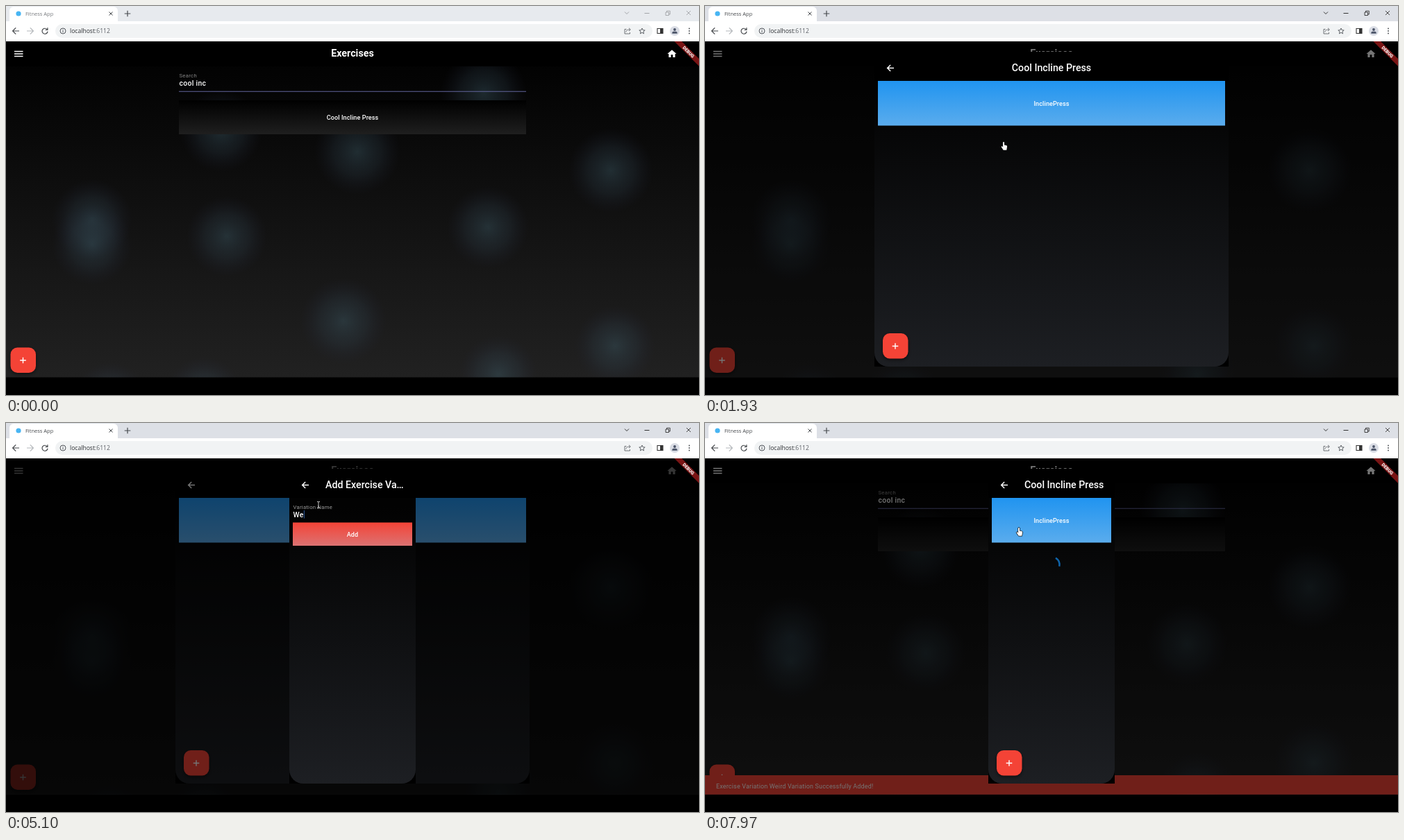
Recreate the animation shown at these times as an HTML page with a canvas. Size 998 px wide and 561 px high, loop 8 s.

```html
<!DOCTYPE html>
<html lang="en">
<head>
<meta charset="utf-8">
<title>Fitness App</title>
<style>
html, body { margin: 0; width: 100%; height: 100%; overflow: hidden; background: #000; }
canvas { display: block; width: 998px; height: 561px; }
</style>
</head>
<body>
<canvas id="stage" width="998" height="561"></canvas>
<script>
const ctx = document.getElementById('stage').getContext('2d');
const LOOP = 8000;
const TYPED = 'Weird Variation';
const APP = 'Roboto, sans-serif', UI = '"Open Sans", sans-serif';

// Moments of the story, in ms
const ACTIVE = 400, HOVER = 880, OPEN = 1280, LOADED = 1620, ADD = 2560,
  FOCUS = 3420, TYPE = 4930, KEY = 105, SUBMIT = 7630, RELOAD = 7760;

const BUBBLES = [
  [688, 126, 62], [310, 180, 59], [506, 210, 62], [871, 237, 61],
  [124, 308, 58], [124, 344, 58], [318, 332, 58], [694, 319, 59],
  [486, 454, 62], [877, 490, 58], [709, 531, 56], [285, 560, 54], [150, 566, 52]
];

// time, x, y, shape used from this moment on
const POINTER = [
  [350, 560, 536, 'arrow'], [HOVER, 451, 166, 'hand'], [1500, 451, 167, 'hand'],
  [1800, 431, 202, 'hand'], [2100, 431, 202, 'arrow'], [2440, 279, 498, 'hand'],
  [2640, 281, 503, 'arrow'], [2880, 281, 503, 'arrow'], [3300, 450, 118, 'beam'],
  [6780, 450, 118, 'beam'], [6930, 442, 124, 'beam'], [7250, 445, 146, 'hand'],
  [7450, 453, 157, 'hand'], [LOOP, 453, 157, 'hand']
];

const clamp = v => Math.max(0, Math.min(1, v));
const ramp = (t, start, span) => clamp((t - start) / span);
const easeOut = v => 1 - (1 - v) ** 3;
const easeInOut = v => v * v * (3 - 2 * v);
const mix = (a, b, v) => a + (b - a) * v;

function rect(x, y, w, h, fill, r = 0) {
  ctx.fillStyle = fill;
  ctx.beginPath();
  ctx.roundRect(x, y, w, h, r);
  ctx.fill();
}

function fade(y0, y1, a, b) {
  const g = ctx.createLinearGradient(0, y0, 0, y1);
  g.addColorStop(0, a);
  g.addColorStop(1, b);
  return g;
}

function text(s, x, y, size, color, { weight = 400, family = APP, align = 'left', gap = 0 } = {}) {
  ctx.font = `${weight} ${size}px ${family}`;
  ctx.textAlign = align;
  ctx.letterSpacing = gap + 'px';
  ctx.fillStyle = color;
  ctx.fillText(s, x, y);
  return ctx.measureText(s).width;
}

function path(d, color, width = 1.2, x = 0, y = 0) {
  ctx.save();
  ctx.translate(x, y);
  ctx.strokeStyle = color;
  ctx.lineWidth = width;
  ctx.stroke(new Path2D(d));
  ctx.restore();
}

function shape(d, fill, x = 0, y = 0, outline) {
  ctx.save();
  ctx.translate(x, y);
  const p = new Path2D(d);
  if (outline) {
    ctx.strokeStyle = outline;
    ctx.lineWidth = 1.4;
    ctx.lineJoin = 'round';
    ctx.stroke(p);
  }
  ctx.fillStyle = fill;
  ctx.fill(p);
  ctx.restore();
}

function disc(x, y, r, fill) {
  ctx.fillStyle = fill;
  ctx.beginPath();
  ctx.arc(x, y, r, 0, 7);
  ctx.fill();
}

const CROSS = 'M-2.5-2.5L2.5 2.5M2.5-2.5L-2.5 2.5';
const PLUS = 'M-4.3 0H4.3M0-4.3V4.3';
const BACK = 'M5 0H-4.2M0.2-4.6L-4.4 0L0.2 4.6';

function browser(active) {
  const ink = active ? '#333' : '#a2a4a8';
  rect(0, 0, 998, 24, active ? '#dde0e6' : '#e7eaee');
  rect(5, 1, 156, 26, '#fff', 6);
  rect(0, 22, 998, 29, '#fff');
  rect(5, 16, 156, 8, '#fff');
  disc(18, 11, 3.6, '#47b5f3');
  text('Fitness App', 28, 14, 7.5, active ? '#45484c' : '#777a7e', { family: UI });
  path(CROSS, '#45484c', 1, 151, 11);
  path(PLUS, '#45484c', 1.2, 175, 11);

  path('M-3-1.5L0 1.5L3-1.5', ink, 1, 894, 10);
  path('M-3.5 0H3.5', ink, 1, 923, 10.5);
  path('M-3-1H1.5V3.5H-3ZM-1.5-1V-2.8H3.3V2H1.5', ink, 0.9, 953, 10);
  path('M-3-3L3 3M3-3L-3 3', ink, 0.9, 983, 10);

  path(BACK, '#45484c', 1.2, 14, 36);
  path('M-5 0H4.2M-0.2-4.6L4.4 0L-0.2 4.6', '#b4b7bb', 1.2, 35, 36);
  path('M3.1-2.3A4 4 0 1 0 4 .6M3.9-4.8V-1.5H.6', '#45484c', 1.2, 56, 36);

  rect(71, 26, 860, 20, '#f1f3f4', 10);
  path('M4 0A4 4 0 1 1-4 0A4 4 0 1 1 4 0M0-.6V2.2M0-2.2V-1.2', '#50545a', 1, 82, 36);
  const w = text('localhost', 92, 39, 8.6, '#2c2f33', { family: UI });
  text(':6112', 92 + w, 39, 8.6, '#5f6368', { family: UI });
  path('M-1.5-2.5H-4V4H3.5V2M-2 1.5C-2-1 0-2 4-2M2-4.2L4.3-2L2 .2', '#5f6368', 0.9, 895, 36);
  path('M0-4L1.2-1.3L4.2-1L1.9.9L2.6 3.9L0 2.3L-2.6 3.9L-1.9.9L-4.2-1L-1.2-1.3Z', '#50545a', 0.9, 916, 36);
  path('M-4-3.5H4V3.5H-4Z', '#333', 1.1, 942, 36);
  rect(942, 32.5, 4, 7, '#333');
  disc(963, 36, 7, '#dadde5');
  disc(963, 34, 1.9, '#4b5468');
  rect(959.3, 36.7, 7.4, 3, '#4b5468', [2, 2, 0, 0]);
  for (const y of [32.5, 36, 39.5]) disc(984, y, 0.9, '#45484c');
}

function fab(x, y, color = '#f44336') {
  ctx.save();
  ctx.shadowColor = 'rgba(0,0,0,.5)';
  ctx.shadowBlur = 5;
  ctx.shadowOffsetY = 2;
  rect(x, y, 36.5, 36.5, color, 10);
  ctx.restore();
  path(PLUS, '#fff', 1.4, x + 18, y + 18.5);
}

function page(t) {
  rect(0, 51, 998, 485, fade(51, 535, '#000', '#212121'));
  for (const [x, y, r] of BUBBLES) {
    const g = ctx.createRadialGradient(x, y, 0, x, y, r);
    g.addColorStop(0, 'rgba(62,92,104,.42)');
    g.addColorStop(0.55, 'rgba(50,68,82,.25)');
    g.addColorStop(1, 'rgba(36,40,62,0)');
    disc(x, y, r, g);
  }
  rect(0, 51, 998, 36, '#000');
  path('M12 65.5H24.5M12 69H24.5M12 72.5H24.5', '#fff', 1.4);
  text('Exercises', 499, 73, 14.3, '#fff', { weight: 700, align: 'center' });
  shape('M0-5.8L6.5 0H4.6V5H1.4V1.3H-1.4V5H-4.6V0H-6.5Z', '#fff', 959, 69);

  text('Search', 249.5, 103, 7.7, '#858585', { gap: 0.3 });
  text('cool inc', 249.5, 115, 10.4, '#fff', { weight: 500, gap: 0.3 });
  rect(249, 122.7, 500, 1, '#62659c');
  rect(249, 136, 500, 49, fade(136, 185, '#000', '#1f1f1f'));
  if (t >= HOVER && t < SUBMIT) rect(249, 136, 500, 49, 'rgba(15,90,125,.13)');
  text('Cool Incline Press', 499, 163.5, 9.1, '#fff', { weight: 500, align: 'center', gap: 0.07 });
  fab(6.5, 492.5);

  const rise = easeOut(ramp(t, 7670, 250));
  if (rise > 0) {
    const y = 535.5 - 27.5 * rise;
    rect(0, y, 998, 28, '#f44336');
    text(`Exercise Variation ${TYPED} Successfully Added!`, 16, y + 19, 9, '#fff', { gap: 0.16 });
  }
}

function barrier(a) {
  rect(0, 51, 998, 485, `rgba(0,0,0,${0.54 * a})`);
}

function panel(left, title) {
  const w = 998 - 2 * left;
  rect(left, 66, w, 454, '#000');
  rect(left, 66, w, 454, fade(120, 520, '#020202', '#1d1f23'), 20);
  rect(left, 66, w, 42, '#000');
  path(BACK, '#fff', 1.4, left + 23, 89.5);
  if (left > 300) text(title, left + 52, 94, 14.2, '#fff', { weight: 500 });
  else text(title, 499, 94, 14.2, '#fff', { weight: 500, align: 'center' });
}

function spinner(age) {
  const start = -Math.PI / 2 + age * 0.0026;
  const sweep = Math.min(4.7, 1.13 * (age / 200) ** 1.3);
  ctx.strokeStyle = '#0f63a8';
  ctx.lineWidth = 2.5;
  ctx.beginPath();
  ctx.arc(499, 204.5, 11.5, start, start + sweep);
  ctx.stroke();
}

function exercise(t) {
  const reload = t >= RELOAD;
  const loading = reload || t < LOADED;
  const left = loading ? 408 : 244;
  panel(left, 'Cool Incline Press');
  rect(left + 5, 108, 988 - 2 * left, 64.5, fade(108, 172, '#2094f0', '#5aaced'));
  text('InclinePress', 499, 143.5, 9.1, '#fff', { weight: 500, align: 'center', gap: 0.07 });
  if (loading) spinner(t - (reload ? RELOAD : OPEN));
  fab(left + 12, 472, t > 2500 && t < 2920 ? '#d63b30' : '#f44336');
}

function variation(t) {
  panel(408, 'Add Exercise Va…');
  const up = easeInOut(ramp(t, FOCUS, 110));
  text('Variation Name', 413.5, mix(128.7, 123.5, up), mix(10.4, 7.7, up), '#9a9a9a', { gap: mix(0.32, 0.25, up) });
  const count = t < TYPE ? 0 : Math.min(TYPED.length, 1 + Math.floor((t - TYPE) / KEY));
  const w = text(TYPED.slice(0, count), 413.5, 135.5, 10.4, '#fff', { weight: 500, gap: 0.3 });
  const lastKey = count ? TYPE + (count - 1) * KEY : FOCUS;
  if (t >= FOCUS && (t - lastKey) % 1000 < 500) rect(413.7 + w, 126, 1, 11.5, '#2f5da0');
  rect(413, 143.5, 172, 33.5, fade(143, 177, '#f44336', '#dc7272'));
  text('Add', 499, 163.5, 9.1, '#fff', { weight: 500, align: 'center', gap: 0.07 });
}

function layer(a, draw, t) {
  if (a <= 0) return;
  barrier(a);
  ctx.globalAlpha = a;
  draw(t);
  ctx.globalAlpha = 1;
}

function banner() {
  ctx.save();
  ctx.beginPath();
  ctx.rect(900, 51, 98, 60);
  ctx.clip();
  ctx.translate(998, 51);
  ctx.rotate(Math.PI / 4);
  rect(-30, 17.6, 60, 7.6, '#791414');
  text('DEBUG', 0, 23.7, 6.4, '#fff', { weight: 900, align: 'center' });
  ctx.restore();
}

function pointer(t) {
  if (t < POINTER[0][0]) return;
  let i = 0;
  while (i < POINTER.length - 2 && t >= POINTER[i + 1][0]) i++;
  const [t0, x0, y0, kind] = POINTER[i], [t1, x1, y1] = POINTER[i + 1];
  const v = easeInOut(ramp(t, t0, t1 - t0));
  const x = mix(x0, x1, v), y = mix(y0, y1, v);
  if (kind === 'hand') {
    shape('M-1.9-5.5Q-.8-6.5 0-5.4V-1.6L3-.9Q4.2-.5 4.1.8L3.3 5.7H-1.3L-4.1 1.5Q-4.5.2-3.2.3L-1.9 1.4Z', '#fff', x, y, '#111');
  } else if (kind === 'arrow') {
    shape('M0-5V4.3L2.1 2.5L3.5 5.6L4.9 5L3.6 2H6.4Z', '#fff', x - 0.5, y, '#111');
  } else {
    path('M-2-4.5H-.6L0-4L.6-4.5H2M0-4V4M-2 4.5H-.6L0 4L.6 4.5H2', '#ddd', 0.9, x, y);
  }
}

function draw(t) {
  rect(0, 0, 998, 561, '#000');
  ctx.save();
  ctx.beginPath();
  ctx.rect(0, 51, 998, 484.5);
  ctx.clip();
  page(t);
  layer(easeOut(ramp(t, OPEN, 150)), exercise, t);
  layer(easeOut(ramp(t, ADD, 150)) * (1 - ramp(t, SUBMIT, 150)), variation, t);
  ctx.restore();
  banner();
  browser(t >= ACTIVE);
  pointer(t);
}

const begin = performance.now();
function tick() {
  draw((performance.now() - begin) % LOOP);
  requestAnimationFrame(tick);
}
tick();
</script>
</body>
</html>
```
